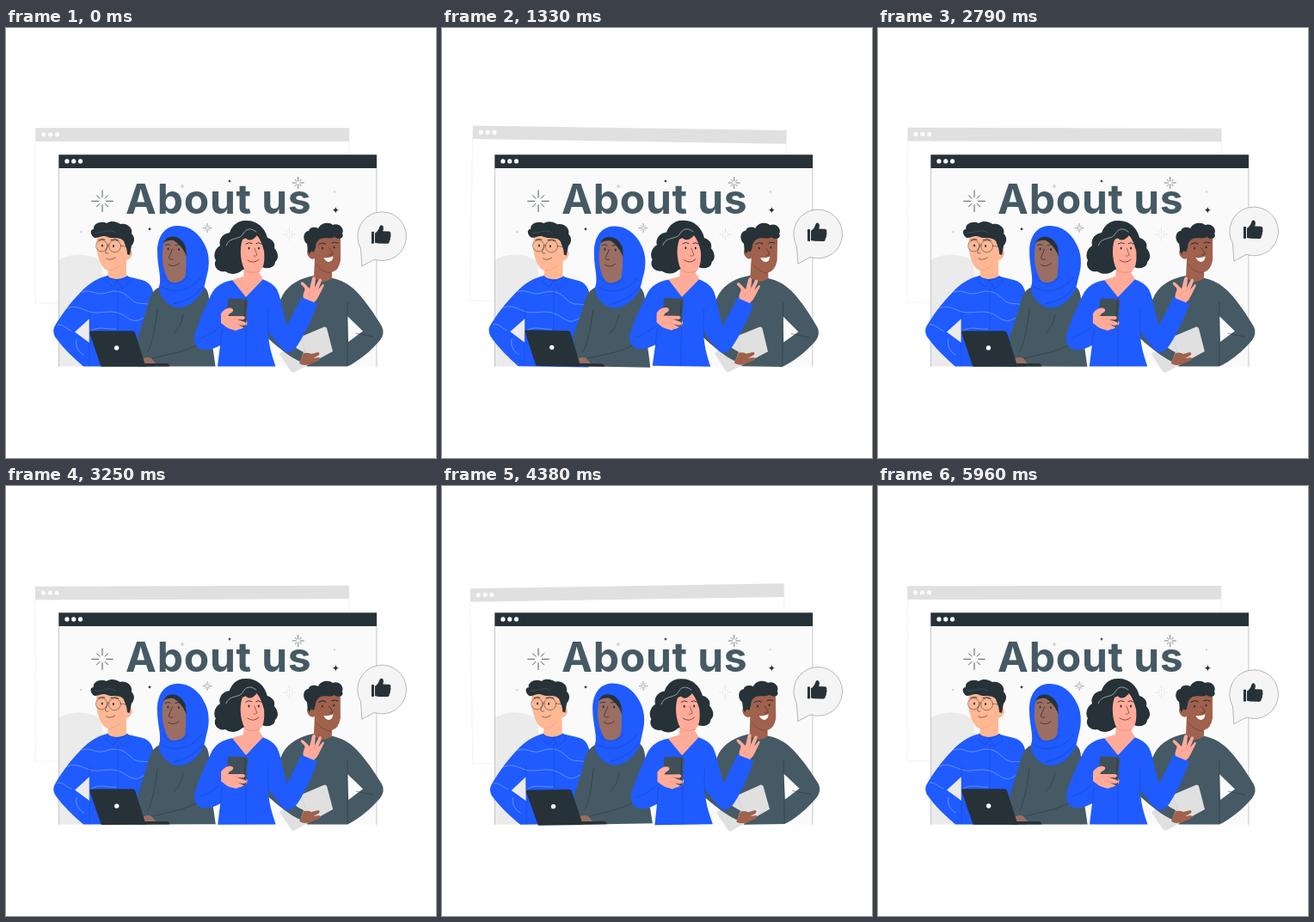
These frames come from a looping animation (500 px wide and 500 px high, 6000 ms). An HTML page with a canvas:

```html
<!DOCTYPE html>
<html lang="en">
<head>
<meta charset="utf-8">
<title>About us</title>
<style>
html, body { margin: 0; width: 100%; height: 100%; overflow: hidden; background: #fff; }
canvas { display: block; width: 500px; height: 500px; }
</style>
</head>
<body>
<canvas id="stage"></canvas>
<script>
const canvas = document.getElementById('stage');
const ctx = canvas.getContext('2d');
const dpr = window.devicePixelRatio || 1;
canvas.width = canvas.height = 500 * dpr;

const LOOP = 6000;
const DARK = '#263238', SLATE = '#455a64', BLUE = '#1f5bff', PALE = '#e0e0e0';
const PEACH = '#ffb794', PINK = '#ffab99', BROWN = '#9a6e63', TAN = '#a0614d';
const SEAM = '#1a47c4';
const paths = {};
const path = d => paths[d] || (paths[d] = new Path2D(d));

function fill(d, color) {
  ctx.fillStyle = color;
  ctx.fill(path(d), 'evenodd');
}
function line(d, color = DARK, width = 0.6) {
  ctx.strokeStyle = color;
  ctx.lineWidth = width;
  ctx.stroke(path(d));
}
function dot(x, y, rx, color, ry = rx) {
  ctx.beginPath();
  ctx.ellipse(x, y, rx, ry, 0, 0, Math.PI * 2);
  ctx.fillStyle = color;
  ctx.fill();
}
function ring(x, y, r, color, width) {
  ctx.beginPath();
  ctx.arc(x, y, r, 0, Math.PI * 2);
  ctx.strokeStyle = color;
  ctx.lineWidth = width;
  ctx.stroke();
}
function turned(x, y, degrees, draw) {
  ctx.save();
  ctx.translate(x, y);
  ctx.rotate(degrees * Math.PI / 180);
  ctx.translate(-x, -y);
  draw();
  ctx.restore();
}
function burst(x, y, r, color, width) {
  ctx.beginPath();
  for (let i = 0; i < 8; i++) {
    const a = i * Math.PI / 4, far = i % 2 ? r * 0.75 : r;
    ctx.moveTo(x + Math.cos(a) * r * 0.36, y + Math.sin(a) * r * 0.36);
    ctx.lineTo(x + Math.cos(a) * far, y + Math.sin(a) * far);
  }
  ctx.strokeStyle = color;
  ctx.lineWidth = width;
  ctx.stroke();
}
function star(x, y, r, color) {
  ctx.beginPath();
  ctx.moveTo(x, y - r);
  for (const [dx, dy] of [[1, 0], [0, 1], [-1, 0], [0, -1]])
    ctx.quadraticCurveTo(x, y, x + dx * r, y + dy * r);
  ctx.fillStyle = color;
  ctx.fill();
  dot(x, y, r * 0.36, color);
}
function eyes(x1, y1, x2, y2) {
  dot(x1, y1, 1, DARK, 1.5);
  dot(x2, y2, 1, DARK, 1.5);
}

function panel(x, y, w, h, body, bar) {
  ctx.fillStyle = body;
  ctx.fillRect(x, y, w, h);
  ctx.fillStyle = bar;
  ctx.fillRect(x, y, w, 15.7);
  for (let i = 0; i < 3; i++) dot(x + 9.6 + i * 7.8, y + 7.6, 2.6, '#fafafa');
}

function backPanel() {
  panel(34.2, 116.2, 365, 203.6, '#fff', PALE);
  line('M34.2 132 V319.8 H399.2 V132', '#e9e9e9', 0.6);
}

function scene() {
  panel(61.3, 147.3, 369.8, 246.2, '#fafafa', DARK);
  fill('M61.5 270 C74 261 98 261 111 272 L122 393.5 H61.5Z', '#ebebeb');
  line('M61.5 163 V393.5 M430.9 163 V393.5', '#8e979b', 0.5);

  burst(112, 201.3, 12.3, DARK, 0.8);
  burst(339.7, 180, 6.6, DARK, 0.6);
  burst(234, 232.5, 5, '#59656a', 0.6);
  burst(329.5, 240, 7, '#dcdcdc', 0.7);
  star(383.3, 211.7, 4.4, DARK);
  star(260, 178, 2.2, DARK);
  star(167, 233.7, 2.5, DARK);
  star(205, 184, 4, '#d6d6d6');
  star(382, 190.3, 2.6, '#d6d6d6');
  star(87.3, 237, 2.8, '#d6d6d6');

  ctx.fillStyle = SLATE;
  ctx.font = '700 48px Inter, "Open Sans", sans-serif';
  ctx.letterSpacing = '0.8px';
  ctx.textAlign = 'left';
  ctx.fillText('About', 139, 215.6);
  ctx.textAlign = 'right';
  ctx.fillText('us', 355.5, 215.6);
}

function manWithGlasses() {
  fill('M118 288 C106 291 96 297 86 308 C74 320 62 337 56 348 Q54 353 57 359 C66 372 80 385 90 393.5' +
    ' H172 V312 C171 302 167 295 158 293 L142 289Z M97 338 L80 353.5 L97 366Z', BLUE);
  const thread = 'rgba(255,255,255,.5)';
  line('M88 307 C100 303 104 312 116 308 S136 306 145 315 S160 318 167 322', thread);
  line('M71 326 C84 320 92 331 104 331 S126 327 138 335 S152 341 160 337', thread);
  line('M60 345 C67 344 70 350 76 352 M82 362 C80 370 84 376 90 380 M99 352 C108 346 118 351 128 350', thread);
  line('M97 325 V393 M130 301 V352', SEAM, 0.5);
  fill('M106 241 C104 253 106 267 111 275 Q114 281 119 282 L118 289 Q128 295 140 289 L140 270' +
    ' C147 269 149 259 144 257 L140 258 L137 239Z', PEACH);
  line('M119 282 Q127 282 133 276', '#e89a78');
  fill('M118 288 Q121 293 130 293 L125 301 L116 295Z M130 293 Q138 293 141 288 L145 295 L135 303Z', BLUE);
  line('M118 288 Q121 293 130 293 L125 301 L116 295 M130 293 Q138 293 141 288 L145 295 L135 303Z', SEAM, 0.6);
  fill('M103 244 C98 241 97 234 102 234 C101 227 111 224 117 227 C123 223 130 226 133 228' +
    ' C141 226 148 233 146 239 C151 244 149 250 146 253 L144 264 L141 263 C141 257 139 254 137 248' +
    ' C133 242 124 246 118 243 C112 240 109 244 103 244Z', DARK);
  line('M104 238 C112 240 119 232 127 238', '#56646a', 0.5);
  ring(111.2, 253.3, 6.6, DARK, 0.5);
  ring(126.5, 253.8, 7, DARK, 0.5);
  line('M118 252 Q119.5 251 120 253 M133.5 253 L143 255', DARK, 0.5);
  eyes(112, 253, 125, 253.5);
  line('M108 246.5 Q112 244.5 115 246 M122 246.5 Q127 244.5 131 247', DARK, 0.9);
  line('M118 254 Q116 259 115.5 261 Q117 263 119 262 M117 268 Q121 271 127 267', DARK, 0.6);
}

function womanWithLaptop() {
  fill('M181 300 C170 304 167 312 164 326 L153 360 L159 393.5 H243.5 C241 372 236 350 236 331' +
    ' C237 314 236 304 229 300Z', SLATE);
  line('M176 328 C174 345 171 365 165 377 M232 327 C232 341 229 350 223 358 M206 333 Q203 350 195 355', DARK, 0.5);
  line('M163 386 C185 380 207 377 221 369 C228 365 232 359 234 351', DARK, 0.5);
  fill('M198 230 C183 231 176 244 176 260 C176 276 180 286 179 297 C175 306 182 318 194 324' +
    ' C204 328 217 322 225 311 C231 304 231 298 233 290 C238 274 236 260 230 250 C224 238 212 229 198 230Z', BLUE);
  fill('M185 246 C181 256 181 271 184 281 Q188 295 193 296 Q203 297 208 290 C210 280 210 263 208 255' +
    ' C203 245 194 241 185 246Z', BROWN);
  fill('M183 250 C187 239 204 240 209 255 L210 266 C207 258 202 251 195 247 Q188 246 183 250Z', DARK);
  line('M182 287 C187 299 203 301 211 289 M181 301 C198 311 217 303 227 290 M195 321 C212 317 223 309 229 300',
    SEAM, 0.8);
  eyes(188.5, 257, 201, 257.5);
  line('M185 252.5 Q188 250.5 191 252 M197 252.5 Q201 250.5 205 253', DARK, 0.9);
  line('M193.5 257 C192 262 189 266 189.5 268 Q191 270 194 269 M189 275 Q195 279 201 274', '#39211d', 0.7);
  fill('M156 387 Q162 381 169 384 L174 390 L160 393Z', BROWN);
  fill('M153 390 L187 390 Q191 391 190 393.5 H153Z', DARK);
  fill('M98.5 352.3 H147 Q149 352.3 150 354 L162.5 393.8 H110.5 L97 354Z', DARK);
  dot(128.6, 372, 2.7, '#fff');
}

function manWithBook() {
  fill('M358 288 C342 291 329 298 322 310 L302 352 L305 361 C317 371 331 382 343 388 L350 393.5 H397' +
    ' C409 388 424 376 435 363 Q441 355 437 347 C428 332 417 316 407 306 C398 297 389 293 380 291Z' +
    ' M397 335 L415 352.5 L398 365Z', SLATE);
  line('M397 319 V392 M407 355 L427 359', DARK, 0.5);
  fill('M357 241 L356 257 C351 254 348 260 352 266 Q355 270 359 268 L358 290 Q368 299 379 291' +
    ' L379 284 Q387 282 389 270 V241Z', TAN);
  line('M361 275 Q367 284 378 285', '#7a4536', 0.7);
  fill('M353 263 C350 259 351 256 350 251 C344 246 346 236 352 236 C353 231 360 231 363 233' +
    ' C367 225 377 226 380 229 C388 226 394 234 391 239 C394 244 387 247 382 243' +
    ' C377 246 370 243 366 245 Q360 248 360 255 L358 261 Q355 257 353 263Z', DARK);
  eyes(368, 256, 381.5, 255);
  line('M364 251.5 Q368 248.5 372 251 M379 250 Q382 248 386 250', DARK, 1);
  line('M376 256 Q379 260 380 263 Q378 265 376 264', '#53281f', 0.7);
  fill('M369.5 267 Q375 268 380.5 265.5 Q380 272 375 272 Q371 271 369.5 267Z', '#fff');
  fill('M343 359 L370 347.5 Q372 347 373 349 L380 376 L336 400 Q333 402 331 399 L318 379Z', PALE);
  line('M343 359 L348 377', '#c9c9c9', 0.5);
  fill('M304 350 L322 358 C328 366 338 373 346 377 L342 388 C331 383 317 372 305 361Z', SLATE);
  fill('M346 378 Q351 377 355 379 L363 377 Q366 378 363 381 L357 384 L364 383 Q367 385 363 387' +
    ' L356 390 Q347 394 341 390Z', TAN);
}

function womanWithPhone() {
  fill('M280 224 C269 223 262 231 260 238 C251 239 247 247 249 253 C242 257 241 266 244 270' +
    ' C240 277 247 285 255 283 C262 288 271 286 275 281 L298 278 C305 281 313 278 313 272' +
    ' C319 267 315 259 312 256 C314 249 308 245 304 244 C301 232 292 224 280 224Z', DARK);
  fill('M264 293 C252 295 243 300 238 311 C231 326 223 343 219 358 Q218 369 225 373 Q235 377 249 369' +
    ' L246 393.5 H313.5 C309 380 305 367 305 353 C312 362 320 374 326 377 Q333 378 339 369' +
    ' C348 355 357 337 362 320 L344 312 L327 346 C322 331 320 314 315 304 Q310 296 298 292Z', BLUE);
  fill('M275 246 C271 257 273 272 277 280 L276 289 L263 293 L279 313 L299 292 L294 284' +
    ' C302 278 301 265 299 249 L290 239Z', PINK);
  line('M277 281 Q284 287 295 283', '#e58c7a', 0.7);
  fill('M277 237 C274 243 274 248 270 257 C273 263 272 270 276 281 L268 283 L262 259 L270 239Z', DARK);
  fill('M276 241 Q283 252 292 241 C296 246 298 252 300 259 L303 246 L291 234 L278 234Z', DARK);
  line('M256 253 C259 242 273 247 276 239 C280 232 286 233 291 237', '#dfe3e5', 0.6);
  eyes(282.5, 256, 294, 256);
  line('M279 251 Q282 248.5 286 250.5 M291 250.5 Q294 248.5 297 251', DARK, 0.9);
  line('M289 256 Q291 261 292 264 Q290 266 288 265', '#733e34', 0.7);
  line('M281 270 Q288 275 294 269', '#8e3027', 0.9);
  line('M279 313 V393 M305 327 Q304 344 305 356 M249 369 L251 350 M225 361 Q236 358 248 348', SEAM, 0.6);
  fill('M252 335 Q255 326 261 326 L271 334 L277 339 Q283 341 279 347 L267 352 Q257 349 252 341Z', PINK);
  fill('M259.5 314.5 L279 315 Q281 315 281 318 L279 346 Q279 348 276 348 L260 345 Q257 344 257 341 L258 316Z',
    '#414f57');
  line('M278.5 317 L277 346', DARK, 0.7);
  fill('M250 332 C254 326 260 324 264 327 Q265 330 260 332 L258 335 L276 335 Q280 337 276 339 L269 339' +
    ' L278 342 Q281 345 276 346 L270 345 L276 348 Q274 351 267 350 C260 352 255 347 250 343Z', PINK);
  line('M265 338 L276 339 M264 343 L276 346', '#e58c7a', 0.5);
  fill('M346 314 C344 309 349 305 347 302 L343 298 Q342 294 346 296 L353 303 L356 291' +
    ' Q358 287 360 291 L359 302 L364 292 Q367 290 367 294 L363 304 L368 298 Q371 297 369 301' +
    ' L364 311 Q362 316 358 319Z', PINK);
  line('M355 306 Q352 308 352 311 M359 302 L358 306', '#e58c7a', 0.6);
}

function bubble() {
  const outline = 'M412.3 256 A28.4 28.4 0 1 1 428.2 269.2 L414.2 276.7Z';
  fill(outline, '#f5f5f5');
  line(outline, '#6c767b', 0.5);
  fill('M425 236.8 H428 V250.6 H425Z', DARK);
  fill('M429 238.5 Q433 236 434.2 231.5 Q435 228.7 437.3 229.5 Q440 231 438.2 236.3 L445.5 236.5' +
    ' Q448 237 447.2 240 Q448.2 242 446.8 244 Q447.6 246.5 445.8 247.7 Q446 250.8 443 250.8 L433 250.6 L429 249.8Z', DARK);
}

// Triangle wave: 0, 1, 0, -1, 0
function sway(p) {
  if (p < 0.25) return p * 4;
  return p < 0.75 ? 2 - p * 4 : p * 4 - 4;
}

function draw(now) {
  const p = (now % LOOP) / LOOP;
  const tilt = sway(p);
  const lift = 6.2 * (1 - Math.abs(2 * p - 1));

  ctx.setTransform(dpr, 0, 0, dpr, 0, 0);
  ctx.fillStyle = '#fff';
  ctx.fillRect(0, 0, 500, 500);
  ctx.lineCap = ctx.lineJoin = 'round';

  turned(216.5, 218, tilt, backPanel);
  scene();
  turned(113, 310, tilt, manWithGlasses);
  turned(170, 312, tilt, womanWithLaptop);
  turned(371, 313, tilt, manWithBook);
  turned(294, 309, tilt, womanWithPhone);

  ctx.save();
  ctx.translate(0, -lift);
  bubble();
  ctx.restore();
}

const start = performance.now();
function tick() {
  draw(performance.now() - start);
  requestAnimationFrame(tick);
}
tick();
</script>
</body>
</html>
```
